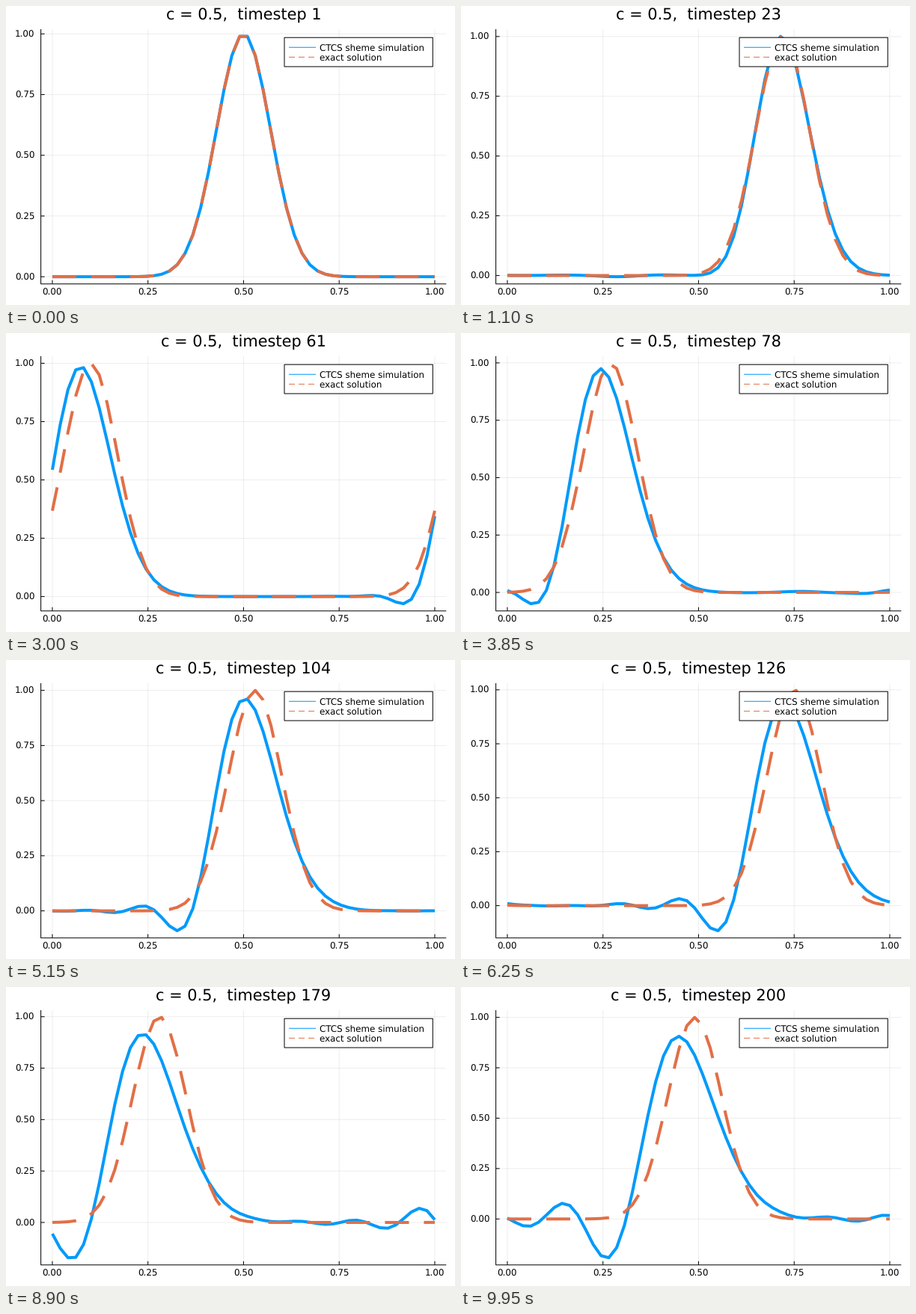
A matplotlib script for the animation above (10000 ms loop, 600x400 px).

```python
import matplotlib.pyplot as plt
import numpy as np
from matplotlib.animation import FuncAnimation
from matplotlib.patches import Rectangle

plt.rcParams.update({
    "font.family": "DejaVu Sans",
    "text.hinting": "none",
    "path.snap": False,
})

W, H, DPI = 600, 400, 100
PT = 72 / DPI  # points per pixel
LEFT, RIGHT, TOP, BOTTOM = 46.6, 588.3, 31.0, 371.8
PAD = 0.03
BLUE, ORANGE = "#009AFA", "#E26F46"
DASH = (0, (8, 5))
SMALL, LARGE = 11.94 * PT, 20.9 * PT

POINTS, STEPS = 50, 200
COURANT, SHIFT = 0.5, 0.01
TICKS = [0, 0.25, 0.5, 0.75, 1]

x = np.linspace(0, 1, POINTS)


def pulse(s):
    return np.exp(-100 * (s - 0.5) ** 2)


def slope(u):
    return np.roll(u, -1) - np.roll(u, 1)


def simulate():
    """Leapfrog advection on a ring, started with one forward Euler step."""
    first = pulse(x)
    states = [first, first - COURANT / 2 * slope(first)]
    while len(states) < STEPS:
        states.append(states[-2] - COURANT * slope(states[-1]))
    return states


def to_px(v):
    return LEFT + (v + PAD) / (1 + 2 * PAD) * (RIGHT - LEFT)


numeric = simulate()
exact = [pulse(np.mod(x - SHIFT * n, 1)) for n in range(STEPS)]
xs = to_px(x)

fig = plt.figure(figsize=(W / DPI, H / DPI), dpi=DPI, facecolor="white")
ax = fig.add_axes([0, 0, 1, 1])
ax.set_xlim(0, W)
ax.set_ylim(H, 0)
ax.axis("off")


def line(px, py, color="black", width=1.0, **kw):
    kw.setdefault("solid_capstyle", "butt")
    return ax.plot(px, py, color=color, lw=width * PT, **kw)[0]


def label(px, py, text, size=SMALL, ha="left", **kw):
    return ax.text(px, py, text, fontsize=size, ha=ha, va="baseline", **kw)


grid = dict(color="black", alpha=0.07, zorder=1)

# Horizontal axis
for t in TICKS:
    p = to_px(t)
    line([p, p], [TOP, BOTTOM], **grid)
    line([p, p], [BOTTOM, BOTTOM - 5], zorder=2)
    label(p, 387, f"{t:.2f}", ha="center")

# Vertical axis, moved in every frame
rows = [(line([LEFT, RIGHT], [0, 0], **grid),
         line([LEFT, LEFT + 5], [0, 0], zorder=2),
         label(38.2, 0, f"{t:.2f}", ha="right")) for t in TICKS]

line([LEFT, LEFT, RIGHT], [TOP, BOTTOM, BOTTOM], zorder=2)

curve = line(xs, xs, BLUE, 4, zorder=3, solid_joinstyle="round")
dashed = line(xs, xs, ORANGE, 4, zorder=4, ls=DASH,
              dash_capstyle="butt", dash_joinstyle="round")
title = label((LEFT + RIGHT) / 2, 18.6, "", LARGE, "center")

# Legend
ax.add_patch(Rectangle((372, 42.2), 198.3, 38.9, fc="white", ec="black",
                       lw=PT, zorder=5))
line([378, 414], [55.3, 55.3], BLUE, zorder=6)
line([378, 414], [68.4, 68.4], ORANGE, zorder=6, ls=DASH,
     dash_capstyle="butt")
label(418.9, 59.7, "CTCS sheme simulation", zorder=6)
label(418.9, 72.8, "exact solution", zorder=6)


def draw(n):
    u, v = numeric[n], exact[n]
    lo, hi = min(u.min(), v.min()), max(u.max(), v.max())
    margin = PAD * (hi - lo)
    lo, hi = lo - margin, hi + margin

    def y_px(value):
        return BOTTOM - (value - lo) / (hi - lo) * (BOTTOM - TOP)

    curve.set_ydata(y_px(u))
    dashed.set_ydata(y_px(v))
    for t, (rule, tick, text) in zip(TICKS, rows):
        p = y_px(t)
        rule.set_ydata([p, p])
        tick.set_ydata([p, p])
        text.set_y(p + 4.4)
    title.set_text(f"c = 0.5,  timestep {n + 1}")
    return []


anim = FuncAnimation(fig, draw, frames=STEPS, interval=50, repeat=True,
                     repeat_delay=0, blit=False)
plt.show()
```
